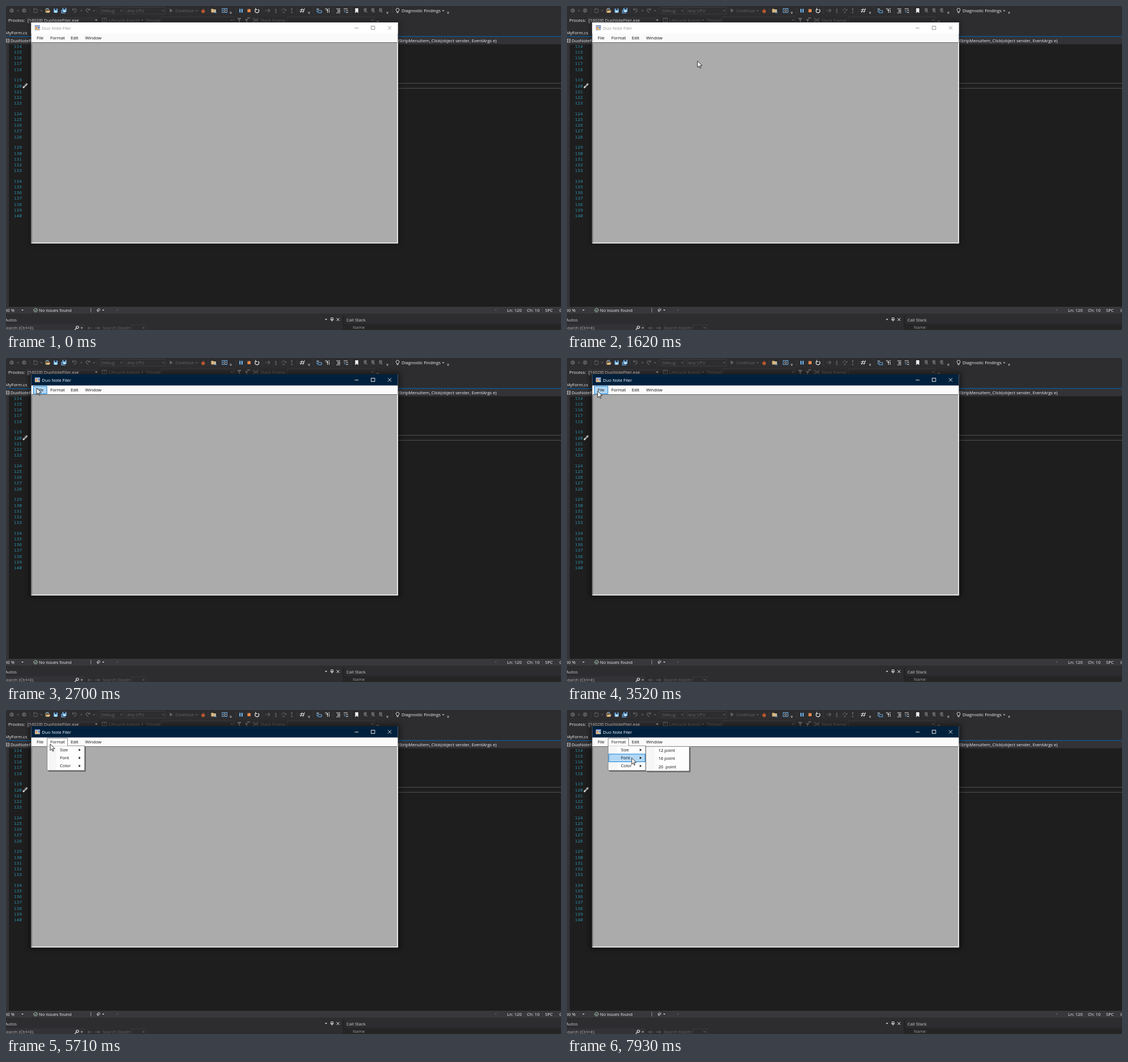
An HTML page that plays this animation: 978 px wide and 572 px high, repeating every 8000 ms.

```html
<!DOCTYPE html>
<html lang="en">
<head>
<meta charset="utf-8">
<title>Window menu demo</title>
<style>
html, body { margin: 0; width: 100%; height: 100%; overflow: hidden; background: #1e1e1e; }
svg { display: block; width: 978px; height: 572px; }
text { font: 7.65px "Open Sans", "Noto Sans", sans-serif; white-space: pre; }
.mono { font: 7.9px "Noto Sans Mono", monospace; }
</style>
</head>
<body>
<svg id="stage" viewBox="0 0 978 572" xmlns="http://www.w3.org/2000/svg"></svg>
<script>
const BAR = '#2d2d30', FIELD = '#333337', LIGHT = '#f1f1f1', DIM = '#656568';
const BLUE = '#75bfff', HOT = '#b3d7f3', HOT_EDGE = '#0078d7';
const LOOP = 8000;

const rect = (x, y, w, h, fill, more = '') =>
  `<rect x="${x}" y="${y}" width="${w}" height="${h}" fill="${fill}" ${more}/>`;
const line = (d, color, w = 1, more = '') =>
  `<path d="${d}" fill="none" stroke="${color}" stroke-width="${w}" ${more}/>`;
const shape = (d, color) => `<path d="${d}" fill="${color}"/>`;
const dot = (x, y, r, color) => `<circle cx="${x}" cy="${y}" r="${r}" fill="${color}"/>`;
// y is the middle of the capitals
const text = (x, y, s, color = LIGHT, more = '') =>
  `<text x="${x}" y="${y + 2.7}" fill="${color}" ${more}>${s}</text>`;
const down = (x, y, color = DIM) => shape(`M${x - 2} ${y - 1}h4l-2 2.2z`, color);
const overflow = x => line(`M${x - 1.7} 10.5h3.4`, '#999', .8) + down(x, 12.7, '#bbb');
const group = (id, body) => `<g id="${id}">${body}</g>`;

function toolbar() {
  let s = rect(0, 0, 978, 54, BAR);
  for (const x of [42, 111, 161, 356, 405, 452, 513, 541, 576, 608, 681])
    s += line(`M${x} 3v11`, '#3f3f44', .7);

  s += dot(10, 8, 3.6, DIM) + line('M12 8h-4m1.6 -1.6l-1.6 1.6 1.6 1.6', BAR, .8);
  s += dot(32, 8, 3.6, DIM) + line('M30 8h4m-1.6 -1.6l1.6 1.6 -1.6 1.6', BAR, .8);
  for (const x of [21, 62, 133, 155, 203, 277]) s += down(x, 8.5);
  s += line('M49 5.5h6v6h-6zM48 4l2 2M51 3.5v2', DIM, .9);

  s += line('M70 11V5.5h2.5l1 1h3', '#dcb67a') + shape('M70 12l1.5-4h6.5l-1.5 4z', '#dcb67a') +
    line('M71 4.5h4m-1.4-1.4l1.4 1.4-1.4 1.4', BLUE, .8);
  const disk = (x, y) => rect(x, y, 7, 7, BLUE) + rect(x + 1.7, y, 3.6, 2.4, BAR) +
    rect(x + 1.5, y + 4.5, 4, 2.5, '#d8ecff');
  s += disk(84, 4.6) + disk(99.5, 3.6) + line('M98 6.5v6h6.5', BLUE, 1.2);
  s += line('M117.5 4v3.2h3.2M117.8 7c3-3.5 7-2 6 1.2L120 12', DIM, 1.1);
  s += line('M147.5 4v3.2h-3.2M147.2 7c-3-3.5-7-2-6 1.2L145 12', DIM, 1.1);

  s += rect(166, 2.5, 41, 11.5, 'none', 'stroke="#434346" stroke-width=".7"') + text(168, 8.4, 'Debug', DIM);
  s += rect(211.5, 2.5, 69, 11.5, 'none', 'stroke="#434346" stroke-width=".7"') + text(213.5, 8.4, 'Any CPU', DIM);
  s += shape('M288.5 4.5v7l5.5-3.5z', DIM) + text(298.5, 8.4, 'Continue', DIM) + down(336, 8.5);
  s += shape('M347.4 4c.3 2 3.3 3 3.3 5.5a3.3 3 0 0 1-6.6 0c0-1.8 1-2 1.2-3.2.8.7 1 1 1.200 1.500 .7-1.200 .7-2 .9-3.800z', '#b5552f');

  s += shape('M361.500 11.500v-6.500h3.500l1 1h4v5.500z', '#dcb67a') +
    line('M368 8.500a1.700 1.700 0 1 0 .1 0M369 11l2 1.500', BLUE, .9);
  s += rect(381, 4.5, 8.500, 7, 'none', `stroke="${BLUE}" stroke-width=".9"`) +
    line('M385.300 6.300a1.700 1.700 0 1 0 .1 0', LIGHT, .8);
  s += overflow(396) + overflow(534) + overflow(672) + overflow(779);
  s += rect(411.3, 5, 2, 6.500, BLUE) + rect(415, 5, 2, 6.500, BLUE) + rect(425.500, 5.500, 5.500, 5.500, '#e8894a');
  s += line('M444.500 5.700a3.500 3.500 0 1 1-4.500 .1M440 3.500v3h3', LIGHT, 1.200);

  s += line('M457 8h8m-3-3l3 3-3 3', DIM, 1.100);
  s += line('M475.500 4v5m-2-2l2 2 2-2', DIM) + dot(475.500, 11.300, 1.200, DIM);
  s += line('M486 9c0-5 6-5 7-1m-2 0h2.500v-2.500', DIM) + dot(489.500, 11.300, 1.200, DIM);
  s += line('M503.500 9v-5m-2 2l2-2 2 2', DIM) + dot(503.500, 11.300, 1.200, DIM);
  s += line('M518 6.500h8M517.500 9.500h8M519 12l3-8M523 12l3-8', LIGHT, .9);
  s += line('M548 4v7M550 8h6v4h-6z', BLUE, .9) + line('M548.500 5.500h3', LIGHT);
  s += line('M562 5h4M568 5h2.500M564 7.500h4M566.500 5v7M569.500 7v5', LIGHT, .9);
  s += line('M582 5h7M584 7.500h5M584 9.500h5M582 12h7', LIGHT, .9);
  s += line('M595 5h7M599 8h4M599 11.500h4', LIGHT, .9) + line('M595 7.500l3 2-2 2', BLUE, .9);
  s += shape('M615.300 4h5.400v8.500l-2.700-2.300-2.700 2.300z', LIGHT);
  for (const x of [630.500, 644, 657.500])
    s += shape(`M${x} 4h5v7l-2.500-2-2.500 2z`, DIM) + line(`M${x + 2} 10.500h4`, '#85858a', .8);
  s += line('M690 4a2.700 2.700 0 0 1 1.500 5v1.500h-3V9a2.700 2.700 0 0 1 1.500-5M688.800 12h2.400', LIGHT, .9);
  s += text(697, 8.400, 'Diagnostic Findings') + down(770.500, 8.500, '#ccc');
  return s;
}

function processBar() {
  let s = text(4, 25, 'Process:') + rect(36, 19, 127, 12, FIELD) + text(38, 25, '[16028] DuoNoteFiler.exe') + down(159, 25, '#ccc');
  s += rect(169.500, 21.500, 7.500, 6.500, 'none', `stroke="${DIM}" stroke-width=".9"`) + line('M173 21v4', DIM);
  s += text(180.500, 25, 'Lifecycle Events', DIM) + down(240, 25) + text(246, 25, 'Thread:', DIM);
  for (const [x, w] of [[274, 128], [496, 153]])
    s += rect(x, 19, w, 12, 'none', 'stroke="#434346" stroke-width=".7"') + down(x + w - 4, 25);
  s += shape('M407 21h8l-3 4v4l-2-1.500v-2.500z', DIM) + shape('M421 23h6l-2 3v3l-2-1v-2zM425 20h5v2h-5z', DIM);
  s += line('M435 22h3l5 6h2M435 28h3l5-6h2M435 25h10', DIM);
  s += text(448.500, 25, 'Stack Frame:', DIM) + line('M653 27h4', '#999', .9);
  return s;
}

function editor() {
  let s = rect(0, 54, 978, 478, '#1e1e1e') + rect(0, 54, 5, 478, FIELD);
  s += text(-1.500, 47.300, 'MyForm.cs') + rect(0, 53.300, 978, 1.300, '#0a6ab0') + rect(0, 54.600, 978, 13, FIELD);
  s += rect(.5, 58.500, 5, 5.500, 'none', 'stroke="#d0d0d0" stroke-width=".9"') + line('M1.500 61.300h3', '#d0d0d0');
  s += text(8, 61.300, 'DuoNoteFiler');
  s += text(864.500, 61.300, 'ToolStripMenuItem_Click(object sender, EventArgs e)', LIGHT, 'text-anchor="end"');
  s += line('M690 136.400h288M690 145.300h288', '#5a5a5a', .9);
  for (let n = 114; n <= 140; n++) {
    const block = Math.min(4, Math.floor((n - 114) / 5));
    const y = 71 + block * 59.500 + (n - 114 - block * 5) * 10.200;
    s += text(13.700, y + .1, n, '#2b91af', 'class="mono"');
  }
  s += line('M30 144.500l3-3', '#d6d6d6', 2.600) + line('M33.500 141l3.800-4', '#d6d6d6', 3) +
    line('M33.300 140.800l3.200-3.400', '#555', 1);
  return s;
}

function panels() {
  let s = rect(0, 531, 978, 41, BAR) + rect(0, 531, 978, 12, '#38383c');
  s += text(-2, 537, '00 %') + down(29, 537, '#ccc');
  s += line('M52 533.800a3.200 3.200 0 1 0 .1 0M50.300 537l1.300 1.400 2.300-2.700', '#b9dcc0', .9);
  s += text(58, 537, 'No issues found') + line('M149.500 533v8', '#aaa', .8);
  s += line('M160 537l3-3 3 2-3 3zM163 536l-2 4', '#ccc', 1) + down(171.500, 537, '#ccc');
  s += shape('M197 534.800v4l-3-2z', '#55555a') + shape('M862 534.800v4l3-2z', '#55555a');
  s += text(883, 537, 'Ln: 120') + text(918, 537, 'Ch: 10') + text(950, 537, 'SPC') + text(975, 537, 'CRLF');

  s += rect(0, 543, 978, 4, BAR) + rect(593, 546, 4, 26, '#252528');
  s += text(-1.500, 553.800, 'Autos', '#d0d0d0') + text(600, 553.800, 'Call Stack', '#d0d0d0');
  s += down(564, 553.500, LIGHT) + line('M572.800 550.500h3.400v3.500h-3.400zM571.500 554h6M574.500 554v3', LIGHT, .9) +
    line('M582.500 551l5 5m0-5l-5 5', LIGHT, 1);
  s += rect(0, 562, 138, 10, FIELD) + text(-3.500, 568.500, 'Search (Ctrl+E)', '#b5b5b5');
  s += line('M125.700 565a2.200 2.200 0 1 0 .1 0M124 568.800l-3 3', LIGHT, 1.200) + down(133.500, 568.500, '#ccc');
  s += line('M152 568.500h-8m3-3l-3 3 3 3M157 568.500h8m-3-3l3 3-3 3', DIM, 1);
  s += text(170.500, 568.700, 'Search Depth:', DIM) + rect(221.500, 563, 25, 10, 'none', 'stroke="#434346" stroke-width=".7"') + down(242, 568.500);
  s += rect(597, 561, 381, 11, '#252526') + text(611, 567, 'Name', '#999');
  return s;
}

const tabs = [['File', 48.500, 24, 54], ['Format', 72.500, 36, 78], ['Edit', 108.500, 25, 114], ['Window', 133.500, 40, 139.500]];

function appWindow() {
  let s = rect(40, 25, 655, 397, '#000', 'id="shade" filter="url(#blur)"');
  s += rect(44.500, 29, 646, 390, '#fff') + rect(44.500, 29, 646, 20, '#fff', 'id="caption"');
  s += rect(51, 34.500, 8.500, 8, '#d9dee8', 'stroke="#7d8794" stroke-width=".6"') + rect(51, 34.300, 8.500, 1.700, '#6d8fc4') +
    rect(52, 37, 3, 2.500, '#d9783a') + rect(56, 37, 3, 2.500, '#5a83c6') + rect(52, 40.200, 6, 1.500, '#e3b24c');
  s += text(63.300, 38.800, 'Duo Note Filer', '#999', 'id="title"');
  s += line('M614.500 39h6.500M643.500 35.500h6.300v6h-6.300zM673 35.500l6 6m0-6l-6 6', '#888', .9, 'id="buttons"');
  s += rect(45, 48.500, 645, 16, '#fafafa');
  s += rect(45, 64, 645, 354, '#ababab') + line('M45.500 418V64.500H690', '#696969') + line('M690 64.500V418.500H45', '#fff', 1.400);
  return s;
}

// Drop-down panel with a soft edge, an icon column and its rows
function dropDown(x, y, w, h, textX, rows, highlight = '') {
  let s = rect(x + 2, y + 2, w, h, '#000', 'opacity=".45"') +
    rect(x, y, w, h, '#fdfdfd', 'stroke="#808080" stroke-width=".9"') + rect(x + 1, y + 1, 15, h - 2, '#f6f6f6') + highlight;
  rows.forEach((r, i) => s += text(textX, y + 7.400 + i * 14.050, r, '#111'));
  return s;
}
const tabFace = ([, x, w]) =>
  rect(x, 49.500, w, 14, '#fdfdfd') + line(`M${x} 63.500V49.800h${w}V63.500`, '#808080', .9);

function menus() {
  const fileMenu = dropDown(48.500, 63.200, 80, 71.500, 71.500, ['New File', 'Open File', 'Close File', 'Save', 'Exit']) + tabFace(tabs[0]);
  let formatMenu = dropDown(72.500, 63.200, 66, 43.500, 95, ['Size', 'Font', 'Color'],
    rect(73.800, 63.800, 63.700, 13.600, HOT, `id="row" stroke="${HOT_EDGE}" stroke-width=".9"`)) + tabFace(tabs[1]);
  for (const y of [70.500, 84.600, 98.700]) formatMenu += shape(`M128.300 ${y - 2.300}v4.600l3.200-2.300z`, '#111');
  return rect(0, 49.900, 0, 13.200, HOT, `id="hover" stroke="${HOT_EDGE}" stroke-width=".9"`) +
    group('fileMenu', fileMenu) + group('formatMenu', formatMenu) +
    group('sizeMenu', dropDown(139, 64.300, 76.500, 43.500, 161, ['12 point', '16 point', '20  point'])) +
    tabs.map(([name, , , x]) => text(x, 56.300, name, '#111')).join('');
}

const arrow = '<path id="cursor" d="M0 0V17L4 13.200 6.600 19.200 9 18.200 6.400 12.200H12Z" fill="#fff" stroke="#111" stroke-width="1.300"/>';

document.getElementById('stage').innerHTML =
  '<defs><filter id="blur"><feGaussianBlur stdDeviation="4"/></filter></defs>' +
  toolbar() + processBar() + editor() + panels() + appWindow() + menus() + arrow;

const el = id => document.getElementById(id);
const set = (id, attrs) => { for (const k in attrs) el(id).setAttribute(k, attrs[k]); };

// Moves: first change, last change, steps, end point, easing power for x and y
const moves = [
  [650, 1420, 12, 334, 201, 1.350, 1.350],
  [1490, 1620, 3, 230, 97, 1, 1],
  [1690, 2240, 9, 52, 54, 2, 3],
  [2310, 2440, 2, 54, 53, 1, 1],
  [3310, 3520, 4, 54, 58.500, 1, 1],
  [5100, 5240, 3, 66, 60, 2, 2],
  [5570, 5710, 3, 78, 60, 1.500, 1.500],
  [6440, 6720, 5, 105, 69, 1.500, 1.500],
  [6920, 6990, 2, 106, 69.500, 3, 3],
  [7580, 7930, 6, 114, 84.500, 1.500, 1.500]
];

function cursorAt(t) {
  let x = 1000, y = 603;
  for (const [from, to, n, tx, ty, px, py] of moves) {
    if (t < from) break;
    const step = Math.floor((t - from) / (to - from) * (n - 1) + .15) + 1;
    const left = 1 - Math.min(1, step / n);
    x = tx + (x - tx) * left ** px;
    y = ty + (y - ty) * left ** py;
  }
  return [x, y];
}

const fade = (t, start, full, end = LOOP) => t < start || t >= end ? 0 : t < full ? .6 : 1;

function draw(t) {
  const [x, y] = cursorAt(t);
  const active = t >= 2700;
  set('cursor', { transform: `translate(${x} ${y}) scale(.67)`, visibility: t < 650 ? 'hidden' : 'visible' });
  set('shade', { opacity: active ? .4 : .2 });
  set('caption', { fill: active ? '#00213d' : '#fff' });
  set('title', { fill: active ? '#fff' : '#999' });
  set('buttons', { stroke: active ? '#fff' : '#888' });

  const tab = t < 4180 && y > 49 && y < 64 && tabs.find(([, left, w]) => x >= left && x < left + w);
  set('hover', tab ? { x: tab[1], width: tab[2] - .5, visibility: 'visible' } : { visibility: 'hidden' });

  set('fileMenu', { opacity: fade(t, 4180, 4310, 5570) });
  set('formatMenu', { opacity: fade(t, 5570, 5710) });
  set('sizeMenu', { opacity: fade(t, 6990, 6990) });
  const row = Math.floor((y - 63.500) / 14);
  set('row', { y: 63.800 + Math.max(0, row) * 14.050, opacity: row < 0 ? 0 : 1 });
}

const start = performance.now();
function tick() {
  draw((performance.now() - start) % LOOP);
  requestAnimationFrame(tick);
}
tick();
</script>
</body>
</html>
```
